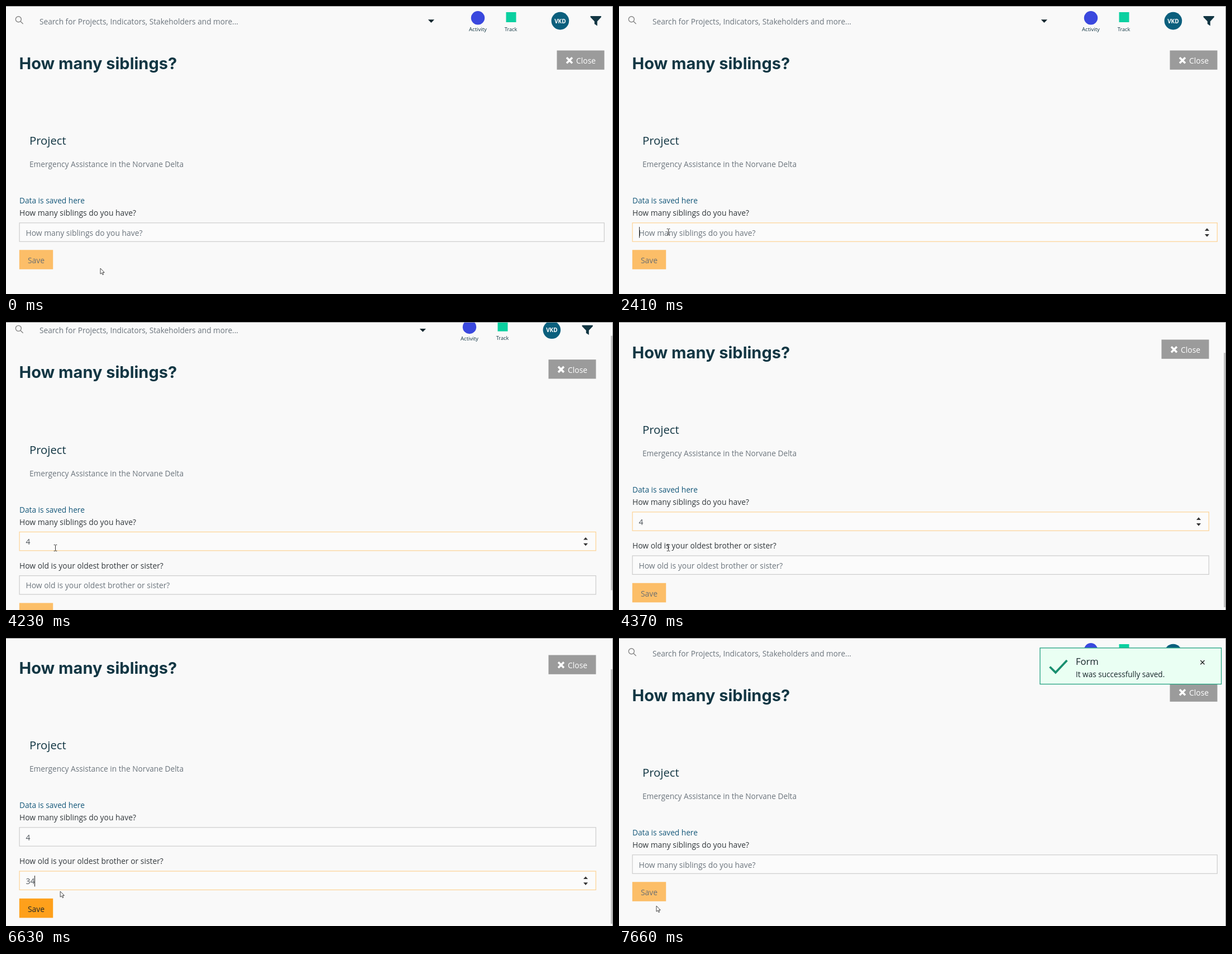
An HTML page for the animation above (8 s loop, 1087 by 515 pixels).

```html
<!DOCTYPE html>
<html lang="en">
<head>
<meta charset="utf-8">
<title>Sibling form</title>
<style>
  html, body { margin: 0; width: 100%; height: 100%; overflow: hidden; background: #f9f9f9; }
  svg { display: block; width: 1087px; height: 515px; }
  text { font: 13.7px "Open Sans", "Noto Sans", sans-serif; white-space: pre; }
  .muted { fill: #6c757d; }
  .dark { fill: #123643; }
  .label { fill: #32383c; font-size: 13.85px; }
  .hint { fill: #6c757d; font-size: 13.85px; }
  .value { fill: #495057; font-size: 13.85px; }
  .mid { text-anchor: middle; }
  .title { font: 700 29px Inter, "Open Sans", sans-serif; }
  .box { fill: #fbfbfb; stroke-width: 1.2; }
</style>
</head>
<body>
<svg viewBox="0 0 1087 515">
  <defs>
    <path id="spin" d="M-4 -3.4L0 -8L4 -3.4ZM-4 2.8L0 7.4L4 2.8Z" fill="#333"/>
  </defs>
  <rect width="1087" height="515" fill="#f9f9f9"/>

  <g id="page">
    <g fill="none" stroke="#858585" stroke-width="1.4">
      <circle cx="22.3" cy="23.7" r="5"/><path d="M26 27.5L30.6 32"/>
    </g>
    <text class="muted" x="60" y="32.5" font-size="13.6">Search for Projects, Indicators, Stakeholders and more...</text>

    <g id="right">
      <path d="M755.8 24.3H767L761.4 30Z" fill="#14262e"/>
      <circle cx="845" cy="21.3" r="12.2" fill="#3a48de"/>
      <rect x="895.5" y="11" width="18" height="18" fill="#0bd0a0"/>
      <text class="dark mid" x="845" y="45" style="font-size:9.6px">Activity</text>
      <text class="dark mid" x="904" y="44.6" style="font-size:9.2px">Track</text>
      <circle cx="992.4" cy="26.6" r="15.8" fill="#0b5f7d"/>
      <text class="mid" x="992.4" y="30.5" fill="#fff" style="font-size:10px;font-weight:700">VKD</text>
      <path class="dark" d="M1046.6 18H1065.8V20L1058.8 27.4V35.4L1053.8 32V27.4L1046.6 20Z"/>
      <rect x="986.5" y="79.5" width="85" height="34.3" fill="#9b9b9b"/>
      <path d="M1004 92.2L1014 102.2M1014 92.2L1004 102.2" stroke="#fff" stroke-width="3.6"/>
      <text x="1021" y="103" fill="#fff" style="font-size:13.9px">Close</text>
    </g>

    <text class="dark title" x="23.5" y="112.7">How many siblings?</text>
    <text class="dark" x="42" y="248" style="font-size:20.3px">Project</text>
    <text class="muted" x="42" y="288">Emergency Assistance in the Norvane Delta</text>
    <text x="24" y="353" fill="#15587a">Data is saved here</text>

    <text class="label" x="24" y="375">How many siblings do you have?</text>
    <rect class="box" id="box1" x="24.1" y="387.8" height="33.4"/>
    <text id="text1" x="35.5" y="410.5"></text>
    <use id="spin1" href="#spin" y="405.3"/>

    <g id="second">
      <text class="label" x="24" y="453">How old is your oldest brother or sister?</text>
      <rect class="box" id="box2" x="24.1" y="466" height="33.4"/>
      <text id="text2" x="35.5" y="488.7"></text>
      <use id="spin2" href="#spin" y="483.5"/>
    </g>

    <rect id="caret" width="1" height="19.5" fill="#222"/>

    <g id="save">
      <rect id="ring" x="20.8" y="-3" width="66.4" height="40.6" fill="#fccb86"/>
      <rect id="face" x="23.8" width="60.4" height="34.6"/>
      <text id="saveText" x="39" y="24" style="font-size:13.85px">Save</text>
    </g>
  </g>

  <rect id="thumb" x="1083" width="3" height="455" fill="#c2c2c2"/>
  <path d="M0 .5H1087M1086.5 0V515" stroke="#909090"/>

  <g id="toast">
    <rect x="754" y="17.8" width="324.6" height="64.7" fill="#eafff3" stroke="#23a080" stroke-width="1.3"/>
    <path d="M771.5 51.5L781.8 61.7L802.3 40" fill="none" stroke="#198f6f" stroke-width="3.8"/>
    <text x="818" y="48.3" fill="#18252b" style="font-size:16.6px">Form</text>
    <text x="818" y="70" fill="#18252b" style="font-size:13.6px">It was successfully saved.</text>
    <path d="M1041.3 40L1048.5 47.2M1048.5 40L1041.3 47.2" stroke="#222" stroke-width="1.4"/>
  </g>

  <g id="pointer">
    <path id="arrow" d="M0 0V10.2L2.4 8.1L4.1 11.7L5.7 11L4.1 7.5H7.2Z" fill="#fff" stroke="#333" stroke-width=".9"/>
    <path id="beam" d="M-2.8 -5.5H-.8L0 -4.8L.8 -5.5H2.8M0 -4.8V4.8M-2.8 5.5H-.8L0 4.8L.8 5.5H2.8" fill="none" stroke="#333"/>
    <path id="hand" d="M-1.6 .8Q-.8 -.6 0 .8V4.2L4 5Q4.9 5.4 4.8 6.5L4 9.8V11.6H-1.4V10L-4 7Q-4.6 5.6 -3.2 5.7L-1.6 7Z" fill="#fff" stroke="#333" stroke-width=".9"/>
  </g>
</svg>

<script>
const LOOP = 8000;
const FOCUS1 = 2410, TYPE1 = 3370, FOCUS2 = 5170, TYPE2 = 6080, TYPE3 = 6300, CLICK = 7080, RESET = 7280;

// [time, x, y]
const PATH = [
  [1020, 169, 469], [1480, 88.5, 404],
  [4860, 88.5, 404], [5010, 97, 420], [5120, 97, 420], [5200, 100, 426],
  [6560, 100, 426], [6760, 92, 502], [6870, 92, 502], [7000, 67, 479]
];
const SCROLL = [[4200, 0], [4230, 12], [4300, 36], [4370, 48], [4475, 48], [4480, 49]];
// [from, to, x, y]
const CARETS = [
  [FOCUS1, 2840, 36, 395], [TYPE1, 3870, 43, 395], [4480, 4900, 43, 395],
  [FOCUS2, 5670, 36, 474], [TYPE2, TYPE3, 43.5, 474], [TYPE3, 6760, 51, 474]
];
const GREY = [204, 204, 204], GOLD = [253, 211, 148];

const el = {};
document.querySelectorAll("[id]").forEach(e => el[e.id] = e);
const set = (id, attrs) => { for (const k in attrs) el[id].setAttribute(k, attrs[k]); };
const show = (id, on) => { el[id].style.display = on ? "" : "none"; };
const clamp = v => Math.max(0, Math.min(1, v));
const within = (t, a, b) => t >= a && t < b;

function track(keys, t, i = 1) {
  let n = keys.findIndex(k => k[0] > t);
  if (n === 0) return keys[0][i];
  if (n < 0) return keys[keys.length - 1][i];
  const a = keys[n - 1], b = keys[n];
  return a[i] + (b[i] - a[i]) * (t - a[0]) / (b[0] - a[0]);
}

function border(t, on, off) {
  const p = clamp((t - on + 30) / 140) * (t >= on) * (1 - clamp((t - off + 30) / 140) * (t >= off));
  return `rgb(${GREY.map((g, i) => Math.round(g + (GOLD[i] - g) * p))})`;
}

function field(n, value, hint) {
  const e = el["text" + n];
  e.textContent = value || hint;
  e.setAttribute("class", value ? "value" : "hint");
}

function draw(t) {
  const long = within(t, TYPE1, RESET);
  const scroll = t < RESET ? track(SCROLL, t) : 0;
  const shift = long ? -15 : 0;
  const x = track(PATH, t, 1), y = track(PATH, t, 2);

  set("page", { transform: `translate(0 ${-scroll})` });
  set("right", { transform: `translate(${shift})` });
  set("thumb", { y: 14 + scroll * 42 / 49 });
  show("thumb", long);
  show("second", long);

  const fresh = t >= RESET;
  set("box1", { width: 1047.2 + shift, stroke: fresh ? "#ccc" : border(t, FOCUS1 - 110, FOCUS2) });
  set("box2", { width: 1047.2 + shift, stroke: border(t, FOCUS2, CLICK) });
  if (t < FOCUS1) set("box1", { stroke: "#ccc" });
  field(1, long ? "4" : "", "How many siblings do you have?");
  field(2, t < TYPE2 ? "" : t < TYPE3 ? "3" : "34", "How old is your oldest brother or sister?");

  set("spin1", { x: 1053 + shift });
  set("spin2", { x: 1053 + shift });
  show("spin1", t < FOCUS2 && (t >= FOCUS1 || y < 421));
  show("spin2", within(t, 4990, CLICK));

  const caret = CARETS.find(c => within(t, c[0], c[1]));
  show("caret", caret);
  if (caret) set("caret", { x: caret[2], y: caret[3] });

  const overSave = long && scroll > 40 && x < 84 && y > 466 && y < 501;
  const enabled = fresh ? 0 : clamp((t - TYPE2) / 150);
  set("save", { transform: `translate(0 ${long ? 514.8 : 436.2})`, opacity: .65 + .35 * enabled });
  set("face", { fill: overSave ? "#fb9300" : "#fea01b" });
  set("saveText", { fill: overSave ? "#fff" : "#212529" });
  show("ring", within(t, CLICK, RESET));

  show("toast", fresh);
  set("toast", { opacity: clamp((t - RESET) / 340) });

  const beam = !overSave && y < (long ? 451 : 421);
  set("pointer", { transform: `translate(${x} ${y})` });
  show("hand", overSave);
  show("beam", beam);
  show("arrow", !overSave && !beam);
}

function tick() {
  draw(performance.now() % LOOP);
  requestAnimationFrame(tick);
}
tick();
</script>
</body>
</html>
```
